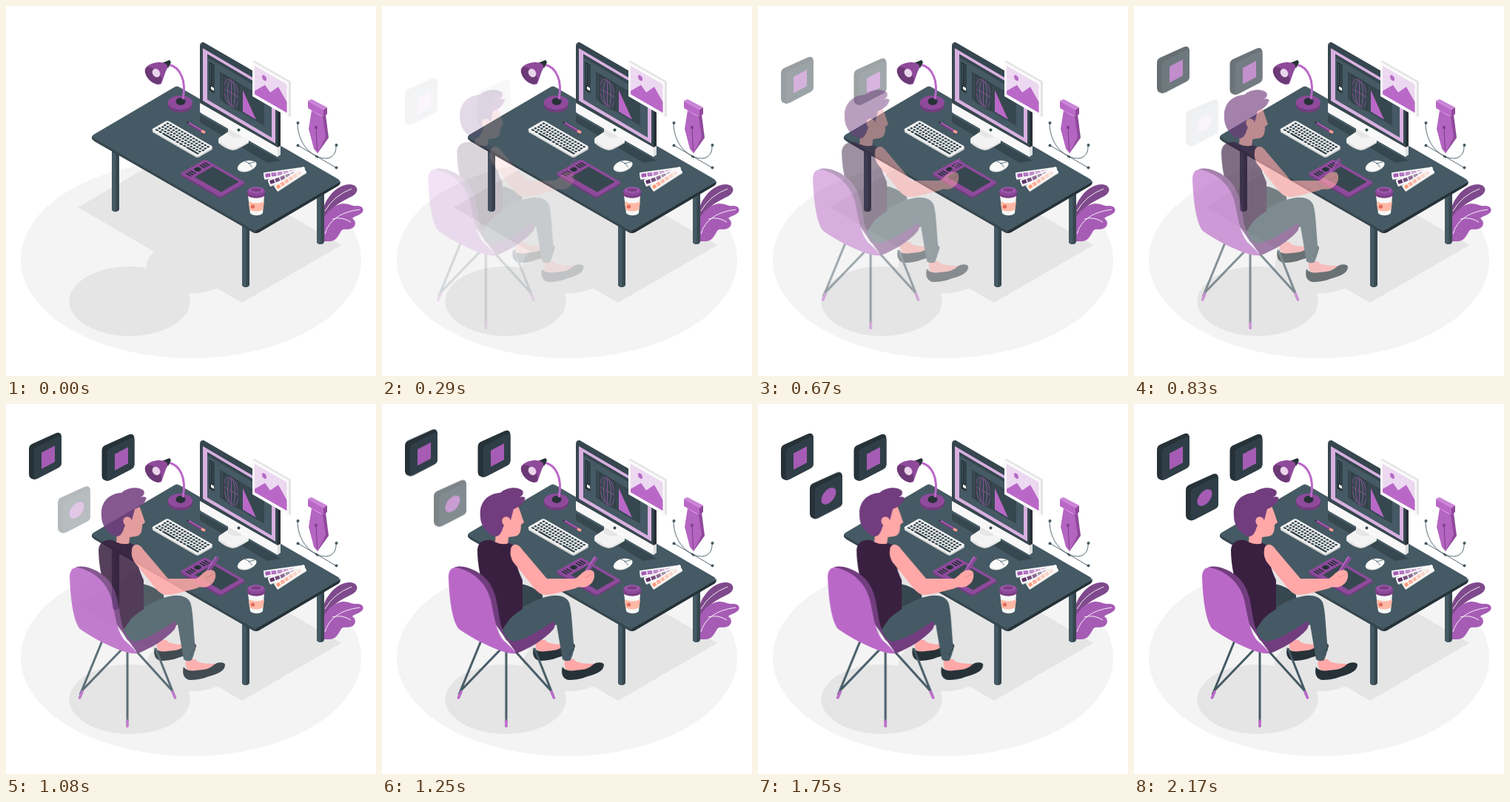
An HTML page for the animation above (2210 ms loop, 500 by 500 pixels).

```html
<!DOCTYPE html>
<html lang="en">
<head>
<meta charset="utf-8">
<title>Designer at a desk</title>
<style>
  html, body { margin: 0; width: 100%; height: 100%; overflow: hidden; background: #fff; }
  svg { display: block; width: 100vw; height: 100vh; }
  .loop { opacity: 0; animation: 2.21s linear infinite; }
  #person { animation-name: slide; }
  #tileA { animation-name: riseA; }
  #tileB { animation-name: riseB; }
  #tileC { animation-name: riseC; }

  @keyframes slide {
    0% { opacity: 0; transform: translateX(-39px); }
    22.62% { opacity: .33; transform: translateX(-23px); }
    37.56% { opacity: .65; transform: translateX(-13px); }
    48.87% { opacity: .86; transform: translateX(-6px); }
    56.5% { opacity: 1; transform: translateX(-2.2px); }
    64.25% { opacity: 1; transform: translateX(.5px); }
    72% { opacity: 1; transform: translateX(1.9px); }
    79.19% { opacity: 1; transform: translateX(2.2px); }
    88% { opacity: 1; transform: translateX(1.6px); }
    98.19%, 100% { opacity: 1; transform: none; }
  }
  @keyframes riseA {
    0%, 10% { opacity: 0; transform: translateY(62px); }
    22.62% { opacity: .23; transform: translateY(44px); }
    37.56% { opacity: .7; transform: translateY(15px); }
    43% { opacity: .87; transform: translateY(6px); }
    48.87% { opacity: 1; transform: translateY(-1px); }
    53% { opacity: 1; transform: translateY(-4.3px); }
    57.5% { opacity: 1; transform: translateY(-5.8px); }
    64.25% { opacity: 1; transform: translateY(-4.6px); }
    72% { opacity: 1; transform: translateY(-1.6px); }
    79.19%, 100% { opacity: 1; transform: none; }
  }
  @keyframes riseB {
    0%, 11% { opacity: 0; transform: translateY(62px); }
    22.62% { opacity: .21; transform: translateY(45px); }
    37.56% { opacity: .68; transform: translateY(16px); }
    43% { opacity: .86; transform: translateY(7px); }
    48.87% { opacity: 1; transform: none; }
    53% { opacity: 1; transform: translateY(-3.6px); }
    58% { opacity: 1; transform: translateY(-5.6px); }
    64.25% { opacity: 1; transform: translateY(-4.6px); }
    72% { opacity: 1; transform: translateY(-1.7px); }
    79.19%, 100% { opacity: 1; transform: none; }
  }
  @keyframes riseC {
    0%, 33% { opacity: 0; transform: translateY(37px); }
    37.56% { opacity: .07; transform: translateY(32px); }
    48.87% { opacity: .34; transform: translateY(17px); }
    56.5% { opacity: .6; transform: translateY(8.5px); }
    64.25% { opacity: .84; transform: translateY(2px); }
    70% { opacity: 1; transform: translateY(-1.2px); }
    76% { opacity: 1; transform: translateY(-2.6px); }
    79.19% { opacity: 1; transform: translateY(-2.2px); }
    90%, 100% { opacity: 1; transform: none; }
  }
</style>
</head>
<body>
<svg viewBox="0 0 500 500">
  <defs>
    <g id="leg">
      <path fill="#37474f" d="M0 0H10V84Q9 87 5 87Q1 87 0 84Z"/>
      <path fill="#455a64" d="M0 0H5.500V87Q1 87 0 84Z"/>
    </g>
    <g id="tile">
      <path fill="#263238" d="M31 62Q31 57 35 55L66 41Q74 37 75 45V80Q75 85 71 87L43 101.500Q39 104 35 102L33 101Q31 99 31 96Z"/>
      <path fill="#303f47" d="M38 66Q38 61 42 59L70 45Q75 43 75 48V80Q75 85 71 87L43 101.500Q38 104 38 98Z"/>
    </g>
    <g id="foot">
      <path fill="#ffa8a7" d="M249 344L262 345C264 349 270 351 291 351C289 358 275 361 262 361C252 361 247 360 249 344Z"/>
      <path fill="#263238" d="M246 355C251 363 262 360 272 359C283 358 286 352 291 350C296 348.500 301 349 302 352C302 359 296 363 287 366C276 369 270 373 255 373C245 372 244 362 246 355Z"/>
    </g>
  </defs>

  <!-- floor and shadows -->
  <ellipse cx="250" cy="342.500" rx="230" ry="133.500" fill="#f4f4f4"/>
  <g fill="#e5e5e5">
    <path d="M97 272L319 401L453 323L230 195Z"/>
    <ellipse cx="250" cy="352" rx="60" ry="36.500"/>
    <ellipse cx="167" cy="399" rx="81.500" ry="47"/>
  </g>

  <!-- leaves -->
  <path fill="#7f4a8c" d="M426 288C427 264 445 241 465 241C476 242 478 251 468 257C454 264 440 270 430 288Z"/>
  <path fill="#a65cb5" d="M426 318V296C431 278 444 268 456 267C464 267 468 271 475 270C481 270 484 274 482 278C479 283 470 284 468 287C474 291 473 299 466 301C458 303 456 300 453 304C449 310 447 318 436 318Z"/>
  <g fill="none" stroke="#fff" stroke-width=".9">
    <path d="M431 277Q443 256 467 247M431 308Q439 280 478 275M441 288Q454 284 466 292"/>
  </g>

  <!-- desk -->
  <use href="#leg" x="143" y="191"/>
  <use href="#leg" x="319" y="293"/>
  <use href="#leg" x="420" y="235"/>
  <path fill="#263238" d="M116 176V179Q117 181 120 183L334 306Q338 308 342 306L449 243Q452 241 452 237L337 300Z"/>
  <path fill="#37474f" d="M116 176V179Q117 181 120 183L334 306Q336 307 338 307V300Z"/>
  <path fill="#455a64" d="M118 174L227 110Q231 107 235 110L449 234Q453 237 449 239L341 302Q337 304 333 302L119 179Q115 176 118 174Z"/>

  <!-- lamp -->
  <path fill="#713d7e" d="M219 130V134C219 147 252 147 252 134V130Z"/>
  <ellipse cx="235.500" cy="130.500" rx="16.500" ry="9.500" fill="#8f4a9b"/>
  <ellipse cx="236" cy="129" rx="6.500" ry="5" fill="#263238"/>
  <path fill="none" stroke="#ba68c8" stroke-width="3" d="M239 126C244 101 236 82 219 79"/>
  <path fill="#263238" d="M211 77L221 73L223 76L219 84Z"/>
  <path fill="#8f4a9b" d="M188 85C192 77 209 73 217 79Q220 82 216 88L210 105C204 110 186 97 188 85Z"/>
  <ellipse cx="199" cy="94" rx="8" ry="14" transform="rotate(-43 199 94)" fill="#6c3a76"/>
  <ellipse cx="203" cy="90.500" rx="5" ry="6" transform="rotate(-35 203 90.500)" fill="#ead3ed"/>

  <!-- monitor -->
  <path fill="#37474f" d="M262 147L371 209L353 212L262 157Z"/>
  <path fill="#e0e0e0" d="M287 180V185Q296 193 306 195Q312 195 328 185V180Z"/>
  <path fill="#f3f3f3" d="M288 178L300 170L318 173L328 180Q329 183 325 185L311 192Q306 194 300 191L289 184Q286 181 288 178Z"/>
  <path fill="#e6e6e6" d="M300 160H318V178Q308 180 300 174Z"/>
  <path fill="#37474f" d="M262 54Q262 49 267 49L369 108Q371 109 371 112V192H367L262 132Z"/>
  <path fill="#263238" d="M367 110L371 111V192H367Z"/>
  <path fill="#f8f8f8" d="M262 131L367 191V204L264 145Q262 144 262 142Z"/>
  <path fill="#dedede" d="M367 191L371 189V201L367 204Z"/>
  <circle cx="314.500" cy="167.500" r="2" fill="#37474f"/>
  <g transform="matrix(1 .59 0 1 266 57)">
    <path fill="#d8b0e0" d="M0 0H98V71H0Z"/>
    <path fill="#455a64" d="M6 4.500H93V66H6Z"/>
    <path fill="#37474f" d="M6 4.500H93V9H6ZM23 18H83V56H23Z"/>
    <path fill="#263238" d="M8.500 13H15.500V52H8.500Z"/>
    <path fill="none" stroke="#607d8b" stroke-width="1" stroke-dasharray="1.500 1.500" d="M10.500 15V43M13.500 15V43"/>
    <path fill="#f5f5f5" d="M11 45H15V49H11Z"/>
    <g fill="none" stroke="#a65cb5" stroke-width=".6">
      <ellipse cx="38.500" cy="38" rx="10" ry="18"/>
      <ellipse cx="38.500" cy="38" rx="5" ry="18"/>
      <path d="M28.500 38H48.500M38.500 20V56"/>
      <path stroke="#263238" d="M28.500 20H48.500V56H28.500Z"/>
    </g>
    <path fill="#ba68c8" d="M54 25L72 54H54Z"/>
  </g>

  <!-- picture card -->
  <path fill="#e4e4e4" d="M333 75L336 74L385 102V149L381 150Z"/>
  <g transform="matrix(1 .577 0 1 333 75)">
    <path fill="#fafafa" d="M0 0H49V47H0Z"/>
    <path fill="#ecd8f0" d="M3 4H46.500V42.500H3Z"/>
    <path fill="#ba68c8" d="M3 38L17 22L24 28L35 14L46.500 28V42.500H3Z"/>
    <ellipse cx="16" cy="13" rx="3" ry="3.500" fill="#ba68c8"/>
  </g>

  <!-- pen nib and handles -->
  <path fill="none" stroke="#455a64" stroke-width=".9" d="M394 158C394 180 406 197 420 203C435 210 447 204 446 188M394 188L446 218.500"/>
  <g fill="#455a64">
    <circle cx="394.500" cy="158" r="2"/><circle cx="394.500" cy="188.500" r="2"/>
    <circle cx="446.500" cy="188" r="2"/><circle cx="446.500" cy="218.500" r="2"/>
    <path d="M418 201L422 203V206L418 204Z"/>
  </g>
  <path fill="#8f4a9b" d="M426 149L432 147L436 178L421 199L418 192Z"/>
  <path fill="#b465c2" d="M413 141L428 150L432 177L421 199L416 193L409 166Z"/>
  <path fill="none" stroke="#7b3f85" stroke-width="1" d="M419 164L420.500 196"/>
  <ellipse cx="419" cy="164" rx="1.800" ry="2.500" fill="#7b3f85"/>
  <path fill="#8f4a9b" d="M429 140L434 137V146L429 150Z"/>
  <path fill="#ba68c8" d="M408 128L429 140V150L408 138Z"/>
  <path fill="#c984d5" d="M408 128L413 126L434 137L429 140Z"/>

  <!-- keyboard -->
  <g transform="matrix(.866 .5 -.866 .5 218 155.500)">
    <rect x="1.500" y="1.500" width="72" height="25" rx="3" fill="#d5d5d5"/>
    <rect x="-1" y="-1" width="72" height="25" rx="3" fill="#fafafa"/>
    <g stroke="#37474f" stroke-width="2.900" stroke-dasharray="3.100 1.400">
      <path d="M2 3H69M2 7.300H69M3 11.600H69M2 15.900H69"/>
      <path stroke-dasharray="4 1.400 4 1.400 20 1.400 4 1.400" d="M2 20.200H69"/>
    </g>
  </g>

  <!-- pencil -->
  <path stroke="#7b3f85" stroke-width="3.600" d="M246 158L265 169"/>
  <path stroke="#ba68c8" stroke-width="1.200" d="M247 157.500L264 167.500"/>
  <path stroke="#ff9e93" stroke-width="3.600" d="M264 168.500L269 171.300"/>
  <circle cx="245.500" cy="157.500" r="1.200" fill="#263238"/>

  <!-- tablet -->
  <g transform="matrix(.866 .5 -.866 .5 269 207)">
    <rect x="1.500" y="1.500" width="63.500" height="40" rx="3" fill="#713d7e"/>
    <rect width="63" height="39" rx="3" fill="#8e4a9b"/>
    <path fill="#37474f" d="M16 4H57V32H16Z"/>
    <path stroke="#263238" stroke-width="2" d="M4 5H12M4 8.500H12M4 12H12M4 27H12M4 30.500H12M4 34H12"/>
    <circle cx="8" cy="19.500" r="4" fill="#263238"/>
  </g>

  <!-- mouse -->
  <path fill="#d8d8d8" d="M313 218V221C317 227 332 225 338 216V213Z"/>
  <path fill="#fafafa" d="M313 218C315 212 323 208 331 209C337 210 340 212 338 215C334 220 327 224 320 223C315 222 312 221 313 218Z"/>
  <path fill="none" stroke="#455a64" stroke-width=".8" d="M323 210Q330 212 332 218M327 213L336 211"/>

  <!-- swatches -->
  <g id="swatches"></g>

  <!-- cup -->
  <path fill="#f7f7f7" d="M327 256H349L347 280C344 284 333 284 330 280Z"/>
  <path fill="#ffb9a6" d="M328 264Q338 269 349 264L347.500 275Q338 280 329 275Z"/>
  <circle cx="333.500" cy="271" r="2.600" fill="#e2685c"/>
  <path fill="#7b3f85" d="M326 250V255C328 261 348 261 350 255V250Z"/>
  <ellipse cx="338" cy="250.500" rx="12" ry="5.500" fill="#8f4a9b"/>
  <ellipse cx="338" cy="248.500" rx="10" ry="4" fill="#a65cb5"/>
  <ellipse cx="338" cy="248.500" rx="7.500" ry="2.600" fill="#7b3f85"/>

  <!-- floating tiles -->
  <g id="tileA" class="loop">
    <use href="#tile"/>
    <rect x="-9" y="-11" width="18" height="22" transform="matrix(1 -.53 0 1 57 73)" fill="#a65cb5"/>
  </g>
  <g id="tileB" class="loop">
    <use href="#tile" x="98.500" y="1"/>
    <rect x="-9" y="-11" width="18" height="22" transform="matrix(1 -.53 0 1 156 74)" fill="#a65cb5"/>
  </g>
  <g id="tileC" class="loop">
    <use href="#tile" x="39" y="54.500"/>
    <circle r="10" transform="matrix(1 -.53 0 1 95.500 126.500)" fill="#a65cb5"/>
  </g>

  <!-- person and chair -->
  <g id="person" class="loop">
    <use href="#foot" x="-39" y="-26"/>
    <path fill="#37474f" d="M190 243Q207 246 219 258L221 290H190Z"/>
    <g fill="none" stroke="#455a64" stroke-width="3">
      <path d="M136 320L106 393M162 332L108 388M208 330L233 393M182 334L231 388M170 334V430"/>
      <path stroke="#ba68c8" stroke-width="3.600" stroke-linecap="round" d="M109 389L105.500 397M231 389L234.500 397M170 428V435.500"/>
    </g>
    <use href="#foot"/>
    <path fill="#455a64" d="M156 296C175 284 198 270 216 263C232 257 249 256 255 268C259 280 259 304 262 331C262 334 260 335 260 338L257 346Q251 349 246 345L238 298L184 327L170 319Z"/>
    <path fill="none" stroke="#37474f" stroke-width="1" d="M262 330Q256 333 256 340"/>
    <path fill="#ffa8a7" d="M156 172L174 174L172 189Q164 193 155 187Z"/>
    <path fill="#3a2040" d="M131 197C132 187 139 183 150 184L156 187Q165 191 174 188L180 191C181 207 185 224 192 238V277Q184 282 175 290L164 306L146 262C135 242 131 215 131 197Z"/>
    <path fill="#ffa8a7" d="M166 148L185 136C189 144 191 152 194 160L190 163C190 171 189 178 181 179C173 180 166 181 160 178Z"/>
    <path fill="#713d7e" d="M135 152C133 134 144 121 162 120C170 112 186 111 192 117C194 121 192 124 188 126C193 124 197 126 195 129C192 137 185 140 180 142L176 157L172 154L166 166Q162 180 155 179C144 176 135 164 135 152Z"/>
    <path fill="#ffa8a7" d="M175 155C170 149 162 154 165 161C167 166 173 168 176 163Z"/>
    <path stroke="#8e4a9b" stroke-width="5" d="M278 228L292 207"/>
    <path stroke="#ba68c8" stroke-width="1.600" d="M277 226L290 206"/>
    <path fill="#ffa8a7" d="M176 197C177 188 186 188 191 196L225 236L263 236C269 233 272 227 278 225C284 223 289 225 289 230C290 238 285 244 278 247C272 249 268 246 264 249C248 253 236 257 224 258C217 258 212 254 208 249L179 213C176 207 175 203 176 197Z"/>
    <path fill="none" stroke="#ee8583" stroke-width=".8" d="M276 235Q282 233 287 229"/>
    <path fill="#713d7e" d="M100 221C107 217 125 221 138 232C153 244 157 262 160 284C163 306 170 319 180 321C199 318 218 303 235 293Q237 298 234 304C222 318 202 330 184 337Z"/>
    <path fill="#ba68c8" d="M92 234C92 222 99 218 110 223C130 230 144 245 149 265C154 287 156 308 167 320C176 328 181 333 183 337Q176 338 164 334C144 327 123 316 106 304C97 294 93 263 92 234Z"/>
  </g>
</svg>
<script>
  // Each strip fans out from one pivot and fades towards it.
  const strips = [["#a65cb5", -8, 54], ["#5f3169", -20, 50], ["#ff9e80", -33, 45]];
  document.getElementById("swatches").innerHTML = strips.map(([color, angle, len]) => {
    const step = (len - 5) / 6;
    let cells = "";
    for (let i = 0; i < 6; i++) {
      cells += `<rect x="${2 - len + i * step}" y="-2.5" width="${step - 1.4}" height="5" fill="${color}" opacity="${1 - i * .15}"/>`;
    }
    return `<g transform="translate(402 222) rotate(${angle})">
      <rect x="${-len}" y="-3.500" width="${len + 2}" height="9" rx="1" fill="#d5d5d5"/>
      <rect x="${-len}" y="-4.500" width="${len + 2}" height="9" rx="1" fill="#fafafa"/>${cells}</g>`;
  }).join("");
</script>
</body>
</html>
```
